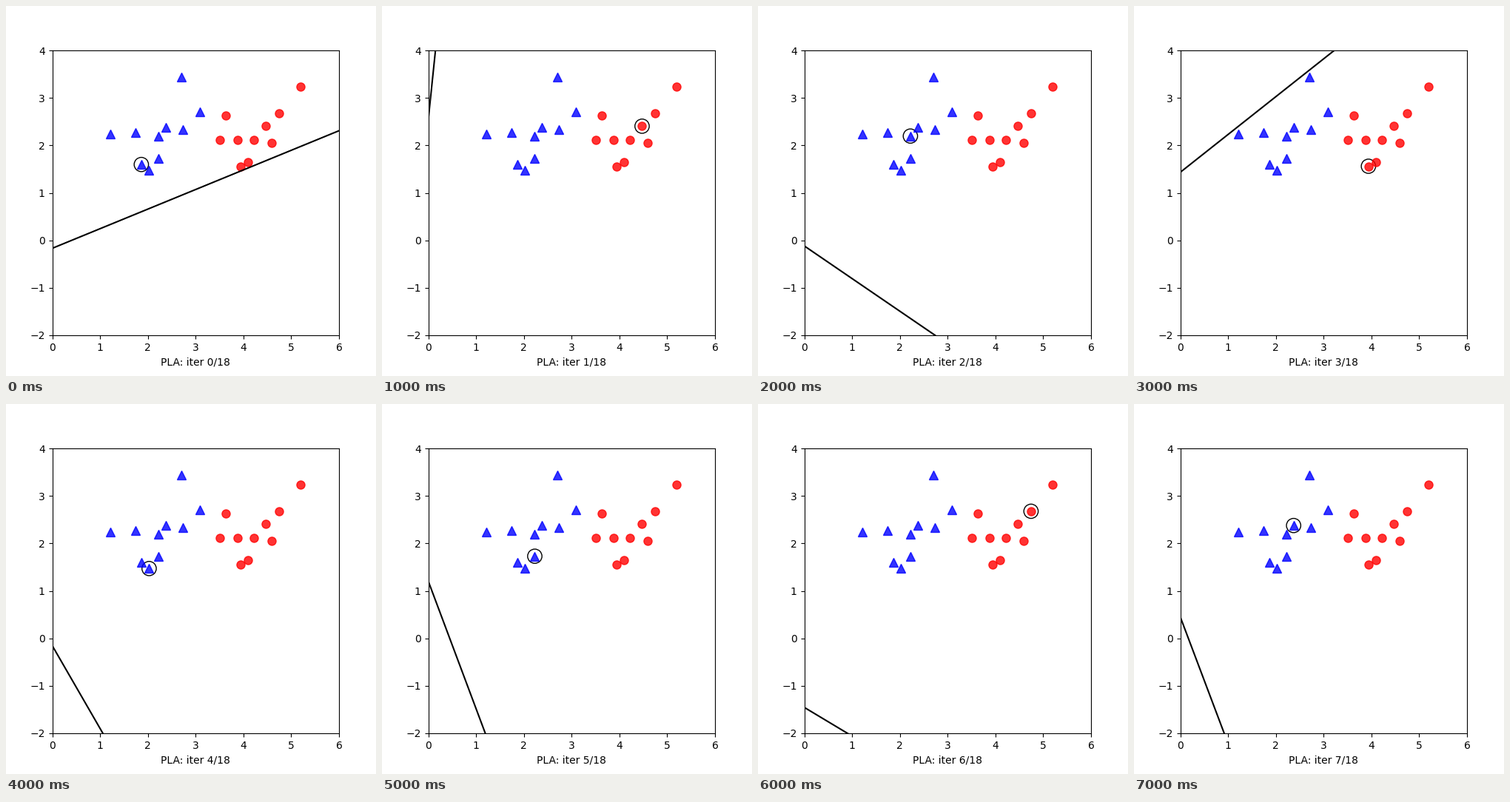
These frames come from a looping animation (500 by 500 pixels, 8 s). A matplotlib script:

```python
import numpy as np
import matplotlib.pyplot as plt
from matplotlib.animation import FuncAnimation

N = 10          # points per class
TOTAL = 18      # updates until the perceptron converges

# Two correlated Gaussian clouds: variance 0.5 along y = x, 0.1 across it
rng = np.random.RandomState(2)
s = np.sqrt(0.05)
spread = np.array([[-0.5, -0.5], [-s, s]])
means = np.repeat([[2, 2], [4, 2]], N, axis=0)
pts = means + rng.randn(2 * N, 2) @ spread
labels = np.repeat([1, -1], N)

# Each misclassified point pulls the weights towards its own side
missed = [7, 10, 0, 18, 3, 6, 14, 9]
weights = [rng.randn(3)]
for k in missed:
    weights.append(weights[-1] + labels[k] * np.r_[1, pts[k]])

fig, ax = plt.subplots(figsize=(5, 5), dpi=100)
ax.plot(*pts[:N].T, 'b^', markersize=8, alpha=0.8)
ax.plot(*pts[N:].T, 'ro', markersize=8, alpha=0.8)
boundary, = ax.plot([], [], 'k')
ring = plt.Circle((0, 0), 0.15, color='k', fill=False)
ax.add_artist(ring)
ax.axis([0, 6, -2, 4])


def update(i):
    w0, w1, w2 = weights[i]
    x = np.array([-100, 100])
    boundary.set_data(x, -(w0 + w1 * x) / w2)
    ring.center = pts[missed[i]]
    ax.set_xlabel(f'PLA: iter {i}/{TOTAL}')
    return boundary, ring


anim = FuncAnimation(fig, update, frames=len(missed), interval=1000, repeat=True)
plt.show()
```
